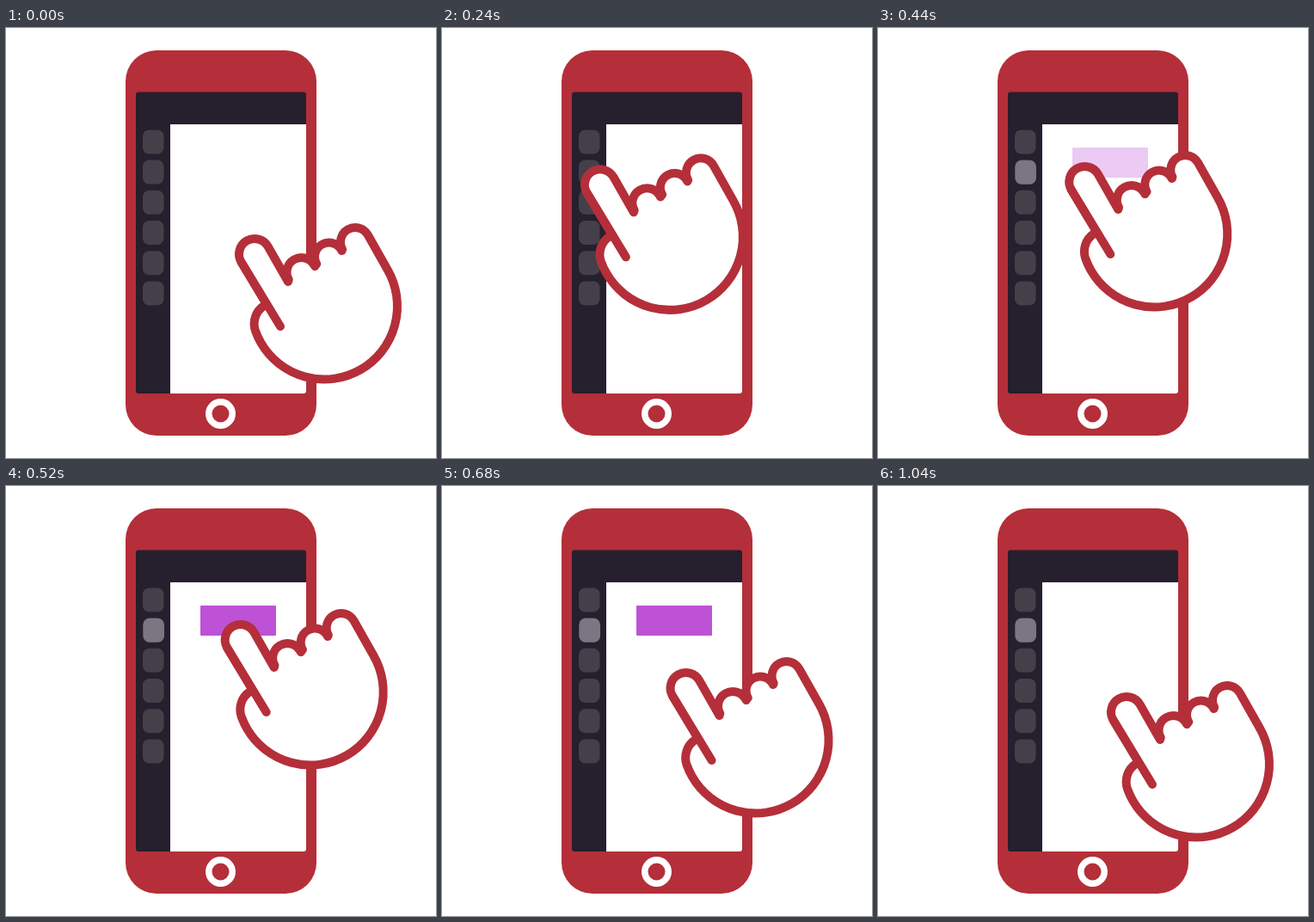
Animation, 500 px wide and 500 px high, one loop 1280 ms. Source, as an HTML page with a canvas:

```html
<!DOCTYPE html>
<html lang="en">
<head>
<meta charset="utf-8">
<title>Tap and place</title>
<style>
  html, body { margin: 0; width: 100%; height: 100%; overflow: hidden; background: #fff; }
  canvas { display: block; width: 500px; height: 500px; }
</style>
</head>
<body>
<canvas id="stage" width="500" height="500"></canvas>
<script>
const ctx = document.getElementById('stage').getContext('2d');
const LOOP = 1280, STEP = 40;
const RED = '#b42f39', DARK = '#261f2e', ICON = '#434049', LIT = '#7b7682', PURPLE = '#bd52d6';

// Hand offset: time, x, y
const PATH = [
  [0, 0, 0], [250, -109.5, -84], [290, -109.5, -84],
  [520, -16.3, -84], [540, -16.3, -84], [750, 0, 0], [LOOP, 0, 0]
];

const rad = deg => deg * Math.PI / 180;
const ramp = (t, a, b) => Math.min(1, Math.max(0, (t - a) / (b - a)));

function handAt(t) {
  const i = PATH.findIndex((p, n) => n > 0 && t <= p[0]);
  const a = PATH[i - 1], b = PATH[i];
  const k = ramp(t, a[0], b[0]);
  return [a[1] + (b[1] - a[1]) * k, a[2] + (b[2] - a[2]) * k];
}

function box(x, y, w, h, r, color, alpha = 1) {
  ctx.globalAlpha = alpha;
  ctx.fillStyle = color;
  ctx.beginPath();
  ctx.roundRect(x, y, w, h, r);
  ctx.fill();
  ctx.globalAlpha = 1;
}

function disc(x, y, r, color) {
  ctx.fillStyle = color;
  ctx.beginPath();
  ctx.arc(x, y, r, 0, Math.PI * 2);
  ctx.fill();
}

function buildHand() {
  const p = new Path2D();
  const arc = (x, y, r, from, to) => p.arc(x, y, r, rad(from), rad(to));
  p.moveTo(304, 323);
  arc(289, 263, 18, 150, 330);      // index fingertip
  p.lineTo(328, 295);
  arc(343.5, 284, 17, 150, 336);    // folded fingers
  arc(375.5, 266, 16.5, 150, 335);
  arc(406, 249, 17, 150, 330);
  arc(370, 323.5, 85, -30, 160);    // palm
  arc(313.6, 344, 25, 160, 237);    // thumb
  p.closePath();
  return p;
}

const hand = buildHand();
const crease = new Path2D('M273.4 272 L319 347');

function drawPhone(t) {
  box(139, 26, 222, 448, 36, RED);
  box(151, 74.5, 198, 350.5, 3, DARK);
  box(191, 112, 158, 313, [0, 0, 3, 0], '#fff');
  for (let i = 0; i < 6; i++) box(159, 118.4 + i * 35.2, 24.5, 28, 7.5, ICON);
  box(159.5, 153.8, 24.5, 28, 7.5, LIT, ramp(t, 250, 340));
  disc(249.5, 448.5, 17.5, '#fff');
  disc(249.5, 448.5, 10, RED);
}

function drawHand(t) {
  ctx.save();
  ctx.translate(...handAt(t));
  ctx.fillStyle = '#fff';
  ctx.fill(hand);
  ctx.strokeStyle = RED;
  ctx.lineWidth = 10;
  ctx.lineCap = ctx.lineJoin = 'round';
  ctx.stroke(hand);
  ctx.stroke(crease);
  ctx.restore();
}

function draw(now) {
  const t = Math.floor((now % LOOP) / STEP) * STEP;
  ctx.fillStyle = '#fff';
  ctx.fillRect(0, 0, 500, 500);
  drawPhone(t);
  box(226, 139, 88, 35, 1, PURPLE, ramp(t, 410, 510) * (1 - ramp(t, 930, 1030)));
  drawHand(t);
}

const start = performance.now();
function tick() {
  draw(performance.now() - start);
  requestAnimationFrame(tick);
}
tick();
</script>
</body>
</html>
```
